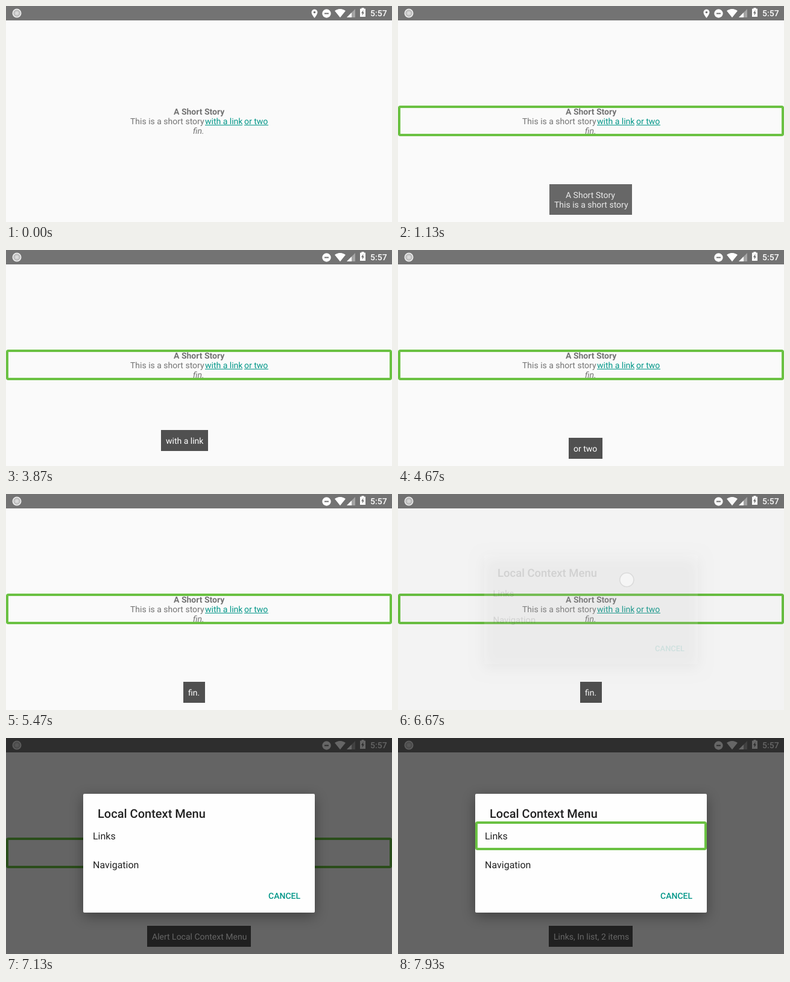
Recreate the animation shown at these times as an HTML page with a canvas. Size 640 by 360 pixels, loop 8000 ms.

```html
<!DOCTYPE html>
<html lang="en">
<head>
<meta charset="utf-8">
<title>A Short Story</title>
<style>
html, body { margin: 0; width: 100%; height: 100%; overflow: hidden; background: #fafafa; }
canvas { display: block; }
</style>
</head>
<body>
<canvas id="stage" width="640" height="360"></canvas>
<script>
const ctx = document.getElementById('stage').getContext('2d');
const LOOP = 8000;
const TEAL = '#009688';
const GREEN = '#6ac142';
const GRAY = '#737373';

// Each toast takes over at a time and glides from the place of the previous one.
const LEAD = 26;
const GLIDE = 250;
const toasts = [
  { at: 1000, x: 251, y: 297, w: 137, lines: [['A Short Story', 27], ['This is a short story', 8]] },
  { at: 3870, x: 281, y: 313, w: 78, lines: [['with a link', 8]] },
  { at: 4670, x: 292, y: 313, w: 56, lines: [['or two', 8]] },
  { at: 5470, x: 302, y: 313, w: 36, lines: [['fin.', 8]] },
  { at: 6870, x: 234, y: 313, w: 172, lines: [['Alert Local Context Menu', 8]] },
  { at: 7670, x: 250, y: 313, w: 139, lines: [['Links, In list, 2 items', 8]] }
];

const OPEN = 6660;      // dialog starts to open
const FOCUS = 7530;     // focus moves into the dialog

const clamp = v => Math.max(0, Math.min(1, v));
const span = (t, start, length) => clamp((t - start) / length);
const easeOut = (p, power) => 1 - Math.pow(1 - p, power);
const mix = (a, b, p) => a + (b - a) * p;

function text(str, x, y, style, color) {
  ctx.font = style + ' Roboto, "Open Sans", sans-serif';
  ctx.textRendering = 'geometricPrecision';
  ctx.fillStyle = color;
  ctx.fillText(str, x, y);
}

function rect(x, y, w, h, color) {
  ctx.fillStyle = color;
  ctx.fillRect(x, y, w, h);
}

function disc(x, y, r, color) {
  ctx.fillStyle = color;
  ctx.beginPath();
  ctx.arc(x, y, r, 0, Math.PI * 2);
  ctx.fill();
}

function poly(points, color) {
  ctx.fillStyle = color;
  ctx.beginPath();
  points.forEach(([x, y]) => ctx.lineTo(x, y));
  ctx.closePath();
  ctx.fill();
}

function ring(x, y, w, h) {
  ctx.strokeStyle = GREEN;
  ctx.lineWidth = 4;
  ctx.beginPath();
  ctx.roundRect(x + 2, y + 2, w - 4, h - 4, 2);
  ctx.stroke();
}

function drawPage() {
  rect(0, 0, 640, 360, '#fafafa');
  text('A Short Story', 278, 181, 'bold 14px', GRAY);
  text('This is a short story', 206, 197, '14px', GRAY);
  text('with a link', 330, 197, '14px', TEAL);
  text('or two', 395, 197, '14px', TEAL);
  rect(330, 198, 62, 1, TEAL);
  rect(395, 198, 40, 1, TEAL);
  text('fin.', 310, 213, 'italic 14px', GRAY);
}

function drawStatus(t) {
  const light = '#fff';
  rect(0, 0, 640, 24, GRAY);

  // record button
  const glow = ctx.createRadialGradient(18, 12, 0, 18, 12, 6);
  glow.addColorStop(0, '#e2e2e2');
  glow.addColorStop(0.5, '#d0d0d0');
  glow.addColorStop(1, '#a8a8a8');
  disc(18, 12, 7.5, '#ececec');
  disc(18, 12, 5.7, glow);

  // location pin
  if (t < 2270) {
    ctx.fillStyle = light;
    ctx.beginPath();
    ctx.arc(511.5, 10.5, 5, Math.PI * 0.9, Math.PI * 2.1);
    ctx.quadraticCurveTo(515.5, 15, 511.5, 20);
    ctx.quadraticCurveTo(507.5, 15, 506.7, 12);
    ctx.fill();
    disc(511.5, 10.5, 1.8, GRAY);
  }

  // do not disturb
  disc(531.5, 12.5, 7.2, light);
  rect(528, 11.5, 7, 2, GRAY);

  // wifi
  ctx.fillStyle = light;
  ctx.beginPath();
  ctx.moveTo(554, 19.2);
  ctx.lineTo(545, 8);
  ctx.bezierCurveTo(545.3, 7.7, 548.8, 4.9, 554, 4.9);
  ctx.bezierCurveTo(559.2, 4.9, 562.7, 7.7, 563, 8);
  ctx.fill();

  // signal
  ctx.globalAlpha = 0.35;
  poly([[565, 19], [579, 19], [579, 5]], light);
  ctx.globalAlpha = 1;
  poly([[565, 19], [573, 19], [573, 11]], light);

  // battery
  rect(587, 4.5, 9, 13.5, light);
  rect(589.5, 3, 4, 2, light);
  poly([[592.5, 6.5], [589, 12], [591, 12], [590.5, 16], [594, 10.5], [592, 10.5]], GRAY);

  text('5:57', 604, 17, '500 14px', light);
}

function drawToast(t) {
  const i = toasts.findLastIndex(o => t >= o.at);
  if (i < 0) return;
  const now = toasts[i];
  const from = toasts[Math.max(0, i - 1)];
  const p = easeOut(span(t, now.at - LEAD, GLIDE), 2);
  const x = Math.round(mix(from.x, now.x, p));
  const y = Math.round(mix(from.y, now.y, p));
  ctx.globalAlpha = i ? 1 : p;
  rect(x, y, now.w, 19 + 16 * now.lines.length, '#505050');
  now.lines.forEach(([str, dx], n) => text(str, x + dx, y + 23 + 16 * n, '14px', '#fff'));
  ctx.globalAlpha = 1;
}

function drawDialog(t) {
  const scale = mix(0.9, 1, easeOut(span(t, OPEN, 220), 5));
  ctx.save();
  ctx.globalAlpha = easeOut(span(t, OPEN, 170), 2);
  ctx.translate(320, 192);
  ctx.scale(scale, scale);
  ctx.translate(-320, -192);
  ctx.save();
  ctx.shadowColor = 'rgba(0,0,0,0.36)';
  ctx.shadowBlur = 22;
  ctx.shadowOffsetY = 6;
  ctx.fillStyle = '#fefefe';
  ctx.beginPath();
  ctx.roundRect(128, 93, 384, 198, 2);
  ctx.fill();
  ctx.restore();
  text('Local Context Menu', 152, 133, '500 20px', '#212121');
  text('Links', 144, 169, '16px', '#212121');
  text('Navigation', 144, 217, '16px', '#212121');
  text('CANCEL', 435, 268, '500 14px', TEAL);
  if (t >= FOCUS) ring(128, 139, 384, 48);
  ctx.restore();
}

function drawTouch(x, y, alpha) {
  ctx.globalAlpha = alpha;
  disc(x, y, 11.5, 'rgba(255,255,255,0.5)');
  ctx.strokeStyle = 'rgba(0,0,0,0.09)';
  ctx.lineWidth = 1.5;
  ctx.stroke();
  ctx.globalAlpha = 1;
}

// A swipe up and to the right opens the menu; a tap then picks the first entry.
function drawTouches(t) {
  if (t >= 6200 && t < 6940) {
    const x = mix(310, 380, easeOut(span(t, 6400, 300), 2));
    const y = mix(240, 143, span(t, 6200, 200));
    drawTouch(x, y, 1 - span(t, 6820, 120));
  }
  if (t >= 7330 && t < 7470) drawTouch(224, 165, 1);
}

function draw(t) {
  drawPage();
  drawStatus(t);
  if (t >= 870 && t < FOCUS) ring(0, 166, 640, 51);
  drawToast(t);
  if (t >= OPEN) {
    rect(0, 0, 640, 360, `rgba(0,0,0,${0.6 * span(t, OPEN, 245)})`);
    drawDialog(t);
  }
  drawTouches(t);
}

const begin = performance.now();
function tick() {
  draw((performance.now() - begin) % LOOP);
  requestAnimationFrame(tick);
}
tick();
</script>
</body>
</html>
```
